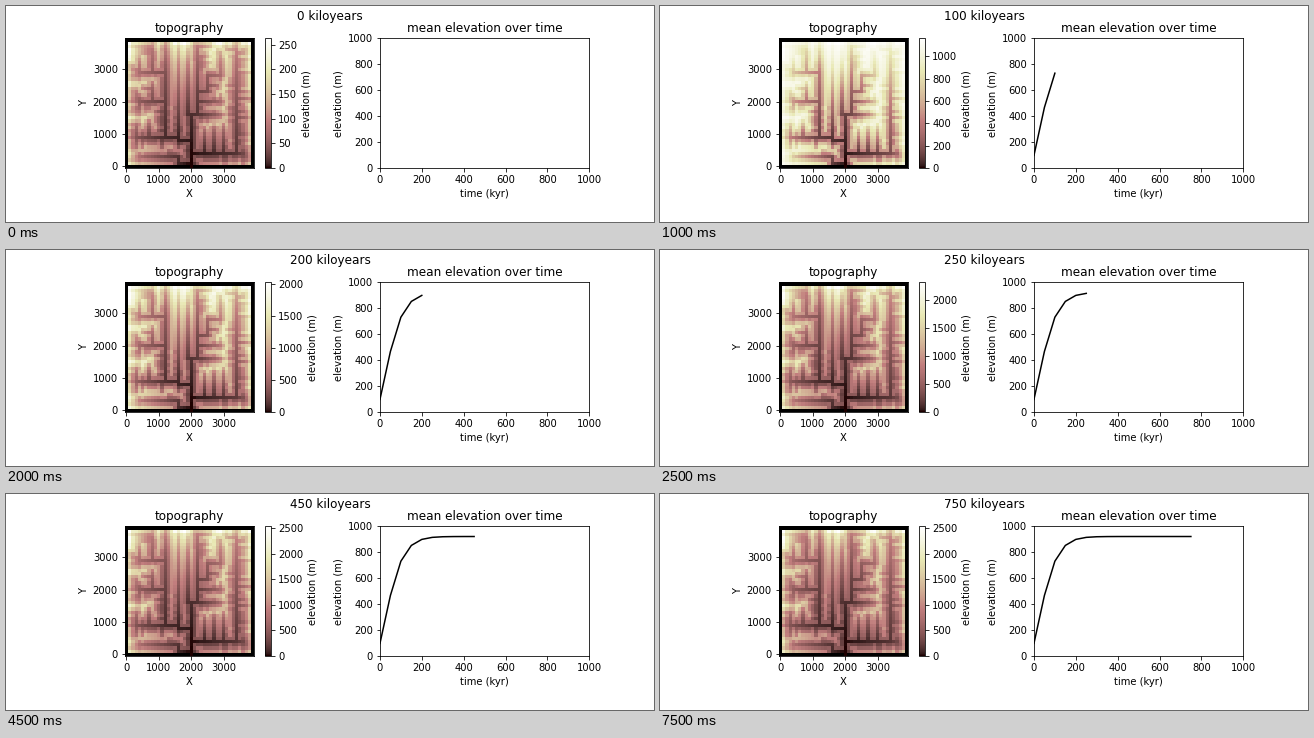
A matplotlib script for the animation above (8000 ms loop, 648 by 216 pixels).

```python
import random

import numpy as np
import matplotlib.pyplot as plt
from matplotlib.animation import FuncAnimation

N, DX = 40, 100             # grid nodes per side, spacing in m
FRAMES, STEP = 16, 50       # frames, kyr per frame
DT = 2.0                    # kyr per implicit solver step
PEAK_OLD, PEAK_NEW = 263, 2535      # highest point in m, before and after
MEAN_OLD, MEAN_NEW = 97, 922        # mean elevation in m
U_NEW = 10.0                        # uplift in m/kyr
U_OLD = U_NEW * PEAK_OLD / PEAK_NEW
OUTLET = (20, 0)


def peak(t):
    """Highest point: rises with uplift, then levels off softly."""
    rise = PEAK_NEW - PEAK_OLD
    x = (U_NEW - U_OLD) * t / rise
    return PEAK_OLD + rise * x / (1 + x ** 7.5) ** (1 / 7.5)


def mean(t):
    """Mean elevation, relaxing towards the new steady state."""
    return MEAN_NEW - (MEAN_NEW - MEAN_OLD) * np.exp(-(t / 74.5) ** 1.3)


def channels():
    """Main channels as (column, row) corners, each listed upstream."""
    yield OUTLET, (20, 16), (19, 16), (19, 37)
    yield (20, 16), (22, 16), (22, 37)
    yield (20, 8), (16, 8), (16, 9), (3, 9)
    yield (20, 4), (36, 4)
    yield (20, 1), (16, 1), (16, 3), (5, 3)
    for col in (12, 16):
        yield (col, 9), (col, 36)
    yield (34, 4), (34, 36)
    for row in (20, 29):
        yield (12, row), (4, row)
        yield (8, row), (8, row + 7)
    for row in (16, 20):
        yield (22, row), (28, row)
    yield (22, 23), (25, 23), (25, 28), (29, 28), (29, 33)
    for col in (24, 27, 30):
        yield (col, 4), (col, 12)


def walk(corners):
    """Yield every cell along an axis-aligned polyline."""
    c, r = corners[0]
    yield c, r
    for c1, r1 in corners[1:]:
        while (c, r) != (c1, r1):
            c += (c1 > c) - (c1 < c)
            r += (r1 > r) - (r1 < r)
            yield c, r


def neighbours(cell):
    c, r = cell
    for p in ((c + 1, r), (c - 1, r), (c, r + 1), (c, r - 1)):
        if p == OUTLET or (0 < p[0] < N - 1 and 0 < p[1] < N - 1):
            yield p


def drainage():
    """Return cells in upstream order, their receivers and response times."""
    rng = random.Random(7)
    rec = {}
    for corners in channels():
        cells = list(walk(corners))
        for a, b in zip(cells, cells[1:]):
            rec.setdefault(b, a)
    fixed = set(rec)

    # Grow side slopes outwards from the channels.
    cost = dict.fromkeys([OUTLET, *rec], 0.0)
    front = {}

    def reach(cell):
        for p in neighbours(cell):
            if p not in cost:
                d = cost[cell] + rng.uniform(0.4, 1.6)
                if p not in front or d < front[p][0]:
                    front[p] = (d, cell)

    for cell in list(cost):
        reach(cell)
    while front:
        cell = min(front, key=front.get)
        cost[cell], rec[cell] = front.pop(cell)
        reach(cell)

    # Let the slopes settle on their steepest descent.
    order = list(rec)
    for _ in range(12):
        area = dict.fromkeys([OUTLET, *rec], 1)
        for cell in reversed(order):
            area[rec[cell]] += area[cell]
        tau = {OUTLET: 0.0}
        for cell in order:
            tau[cell] = tau[rec[cell]] + area[cell] ** -0.6
        for cell in order:
            if cell not in fixed:
                rec[cell] = min(neighbours(cell), key=tau.get)
        order.sort(key=tau.get)
    return order, rec, tau


def simulate():
    """Elevation maps while the land adjusts to faster uplift."""
    order, rec, tau = drainage()
    t = np.array([tau[c] for c in order])
    t /= t.max()
    power = min(np.linspace(0.5, 3, 251),
                key=lambda p: abs((t ** p).mean() - MEAN_NEW / PEAK_NEW))
    t = t ** power * PEAK_NEW / U_NEW

    index = {c: i for i, c in enumerate(order)}
    decay = np.eye(len(order))
    for i, c in enumerate(order):
        j = index.get(rec[c])
        rate = DT / (t[i] - (0 if j is None else t[j]))
        decay[i, i] += rate
        if j is not None:
            decay[i, j] -= rate
    decay = np.linalg.inv(decay)

    cols, rows = np.array(order).T
    gap = (U_OLD - U_NEW) * t
    maps = []
    for k in range(FRAMES):
        z = U_NEW * t + gap
        grid = np.full((N, N), np.nan)
        grid[OUTLET[::-1]] = 0
        grid[rows, cols] = z * peak(k * STEP) / z.max()
        maps.append(np.ma.masked_invalid(grid))
        for _ in range(int(STEP / DT)):
            gap = decay @ gap
    return maps


maps = simulate()
kyr = np.arange(FRAMES) * STEP

plt.rcParams["font.family"] = "DejaVu Sans"
fig, (ax_map, ax_mean) = plt.subplots(1, 2, figsize=(9, 3), dpi=72)
fig.subplots_adjust(left=0.125, right=0.9, bottom=0.25, top=0.85, wspace=0.4)
title = fig.suptitle("", fontsize=12, y=0.98)

cmap = plt.get_cmap("pink").copy()
cmap.set_bad("black")
edges = (np.arange(N + 1) - 0.5) * DX
mesh = ax_map.pcolormesh(edges, edges, maps[0], cmap=cmap,
                         vmin=0, vmax=PEAK_OLD)
ax_map.set(title="topography", xlabel="X", ylabel="Y", aspect=1,
           xticks=range(0, 4000, 1000), yticks=range(0, 4000, 1000),
           xlim=edges[[0, -1]], ylim=edges[[0, -1]])
bar = fig.colorbar(mesh, ax=ax_map)
bar.set_label("elevation (m)")

line, = ax_mean.plot([], [], "k", lw=1.5)
ax_mean.set(title="mean elevation over time", xlabel="time (kyr)",
            ylabel="elevation (m)", xlim=(0, 1000), ylim=(0, 1000),
            xticks=range(0, 1001, 200), yticks=range(0, 1001, 200))


def draw(k):
    top = peak(kyr[k])
    mesh.set_array(maps[k])
    mesh.set_clim(0, top)
    gap = next(s for s in (50, 200, 500) if top / s < 6)
    bar.set_ticks(np.arange(0, top, gap))
    line.set_data(kyr[:k + 1], mean(kyr[:k + 1]))
    title.set_text(f"{kyr[k]} kiloyears")
    return mesh, line, title


anim = FuncAnimation(fig, draw, frames=FRAMES, interval=500,
                     repeat=True, repeat_delay=0, blit=False)
plt.show()
```
